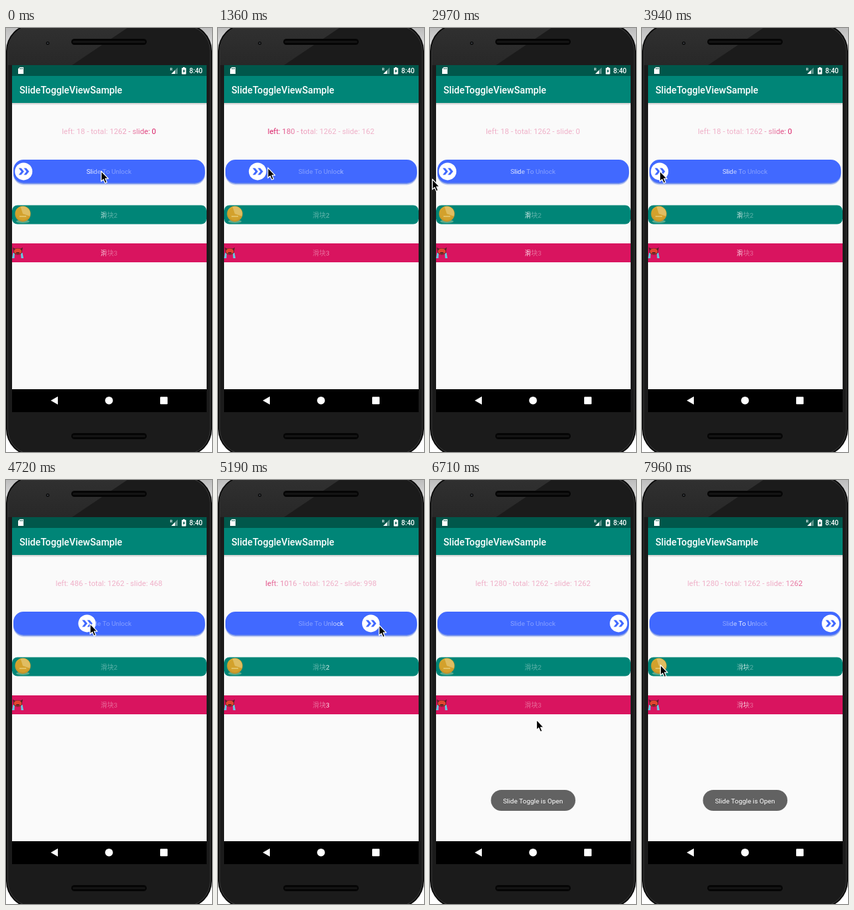
Recreate the animation shown at these times as an HTML page with a canvas. Size 306 px wide and 628 px high, loop 8000 ms.

```html
<!DOCTYPE html>
<html lang="en">
<head>
<meta charset="utf-8">
<title>Slide toggle</title>
<style>
html, body { margin: 0; width: 100%; height: 100%; overflow: hidden; background: #fff; }
canvas { display: block; width: 306px; height: 628px; }
</style>
</head>
<body>
<canvas id="stage"></canvas>
<script>
const W = 306, H = 628, LOOP = 8000, TOTAL = 1262;
const canvas = document.getElementById('stage');
const dpr = window.devicePixelRatio || 1;
canvas.width = W * dpr;
canvas.height = H * dpr;
const ctx = canvas.getContext('2d');
ctx.scale(dpr, dpr);

const TEAL = '#008577', DARK_TEAL = '#00574b', BLUE = '#4169ff', CRIMSON = '#d9145f';
const SANS = 'Roboto, sans-serif';
const CJK = 'Roboto, "Noto Sans CJK SC", "Noto Sans CJK", sans-serif';

const span = (t, from, to) => Math.min(1, Math.max(0, (t - from) / (to - from)));
const mix = (a, b, k) => a + (b - a) * k;

// A short pull that swings back, then a long pull to the end
function slideAt(t) {
  const swing = 307 * Math.sin(Math.PI * span(t, 900, 2680)) ** 2;
  const pull = TOTAL * (1 - (1 - span(t, 4460, 6150)) ** 2.76);
  return Math.round(swing + pull);
}

// Time, x measured from the travelling knob's rest frame, y
const cursorPath = [
  [0, 141, 212], [800, 36, 209], [1360, 41, 207], [2970, 3, 224], [3500, 26, 212],
  [4460, 26, 212], [5190, 38, 215], [6100, 21, 216], [6710, -96, 355],
  [7130, -178, 412], [7700, -251, 300], [7960, -227, 274]
];

function cursorAt(t, travel) {
  const i = Math.max(1, cursorPath.findIndex(p => p[0] >= t));
  const last = cursorPath.length - 1;
  const b = t > cursorPath[last][0] ? last : i;
  const [t0, x0, y0] = cursorPath[b - 1], [t1, x1, y1] = cursorPath[b];
  const k = span(t, t0, t1);
  return [mix(x0, x1, k) + travel, mix(y0, y1, k)];
}

function box(x, y, w, h, r, fill) {
  ctx.beginPath();
  ctx.roundRect(x, y, w, h, r);
  ctx.fillStyle = fill;
  ctx.fill();
}

function oval(x, y, rx, ry, fill) {
  ctx.beginPath();
  ctx.ellipse(x, y, rx, ry, 0, 0, Math.PI * 2);
  ctx.fillStyle = fill;
  ctx.fill();
}

const disc = (x, y, r, fill) => oval(x, y, r, r, fill);

function poly(points, fill) {
  ctx.beginPath();
  points.forEach(([x, y]) => ctx.lineTo(x, y));
  ctx.closePath();
  ctx.fillStyle = fill;
  ctx.fill();
}

function fade(y0, y1, from, to) {
  const g = ctx.createLinearGradient(0, y0, 0, y1);
  g.addColorStop(0, from);
  g.addColorStop(1, to);
  return g;
}

function text(str, x, y, font, fill, align = 'left') {
  ctx.font = font;
  ctx.textAlign = align;
  ctx.fillStyle = fill;
  ctx.fillText(str, x, y);
}

// Centred text with a highlight that sweeps from left to right
function shimmerText(str, y, font, rgb, baseAlpha, phase) {
  ctx.font = font;
  const w = ctx.measureText(str).width, left = 153 - w / 2, half = w * 0.42;
  const p = 0.5 - 0.5 * Math.cos(Math.PI * (phase % 1));
  const c = left - w / 2 + 2 * w * p;
  const g = ctx.createLinearGradient(c - half, 0, c + half, 0);
  for (let s = 0; s <= 8; s++) {
    const glow = (1 - Math.abs(s / 4 - 1)) ** 1.7;
    g.addColorStop(s / 8, `rgba(${rgb},${mix(baseAlpha, 1, glow)})`);
  }
  text(str, left, y, font, g);
}

function speaker(y) {
  box(97, y, 112, 9, 4.5, '#050505');
  box(99, y + 3, 108, 3, 1.5, '#141414');
}

function phone() {
  box(0, 0, W, H, 0, fade(0, 60, '#bdbdbd', '#fff'));
  box(0, -6, W, 640, 40, '#0a0a0a');
  box(2, -4, W - 4, 636, 38, '#3a3a3a');
  box(3, -3, W - 6, 634, 37, '#1b1b1b');
  ctx.save();
  ctx.clip();
  poly([[0, 0], [180, 0], [98, 55], [0, 55]], fade(0, 55, '#303030', '#282828'));
  ctx.restore();
  disc(62, 22.5, 2.5, '#0b0b0b');
  disc(62, 22.5, 1, '#4a4f58');
  speaker(16);
  speaker(600);
}

function appBar() {
  box(9, 55, 289, 514, 0, '#fafafa');
  box(9, 111, 289, 3, 0, fade(111, 114, 'rgba(0,0,0,.2)', 'rgba(0,0,0,.03)'));
  box(9, 55, 289, 16, 0, DARK_TEAL);
  box(9, 71, 289, 40, 0, TEAL);
  poly([[20.5, 58], [26, 58], [26, 68], [18, 68], [18, 60.5]], '#fff');
  for (let x = 20.5; x < 25; x += 1.8) box(x, 59, 0.8, 2.2, 0, DARK_TEAL);
  text('R', 243.5, 62.5, `500 6px ${SANS}`, '#fff');
  poly([[255, 58.5], [255, 68], [245.5, 68]], 'rgba(255,255,255,.35)');
  poly([[251, 62.5], [251, 68], [245.5, 68]], '#fff');
  box(261, 59, 6.5, 9.5, 0.8, '#fff');
  box(263, 58, 2.5, 1.5, 0, '#fff');
  poly([[264.8, 60.5], [262.4, 64.4], [263.9, 64.4], [263.7, 67], [266.1, 63.1], [264.6, 63.1]], DARK_TEAL);
  text('8:40', 292, 67, `500 10px ${SANS}`, '#fff', 'right');
  text('SlideToggleViewSample', 20, 97, `500 14.18px ${SANS}`, '#fff');
}

function navBar() {
  box(9, 535, 289, 34, 0, '#000');
  poly([[66.5, 551.7], [77, 545.7], [77, 557.7]], '#fff');
  disc(153, 551.7, 5.8, '#fff');
  box(229, 546.3, 11, 11, 1, '#fff');
}

function knob(x) {
  const y = 212.4;
  disc(x, y, 13, '#fff');
  for (const l of [x - 7.4, x + 0.2]) {
    poly([[l, y - 5], [l + 3.8, y - 5], [l + 8, y], [l + 3.8, y + 5], [l, y + 5], [l + 4, y]], BLUE);
  }
}

function coin() {
  const x = 25, y = 275.3;
  oval(x, y + 11.2, 10, 2.5, '#58aa8c');
  disc(x, y, 11.6, fade(y - 12, y + 12, '#dcab30', '#c0922c'));
  disc(x, y, 9.6, '#d3a12c');
  ctx.beginPath();
  ctx.moveTo(x, y);
  ctx.arc(x, y, 11, -Math.PI * 0.6, Math.PI * 0.1);
  ctx.fillStyle = '#e0bd62';
  ctx.fill();
  box(x - 5, y + 3, 10, 1.5, 0, '#e8cc74');
}

function imp() {
  const x = 17.5, y = 331;
  for (const s of [-1, 1]) {
    const at = (dx, dy) => [x + s * dx, y + dy];
    poly([at(4.5, 2), at(7, 2), at(8.5, 10), at(5, 10)], '#66cbe2');
    poly([at(7.5, -6), at(2.5, -3.5), at(6, 1)], '#5a2028');
  }
  oval(x, y, 6.5, 5, '#5a2028');
  oval(x, y - 0.3, 5.8, 4.3, '#e2452f');
  oval(x, y + 2.2, 3, 1, '#3b1d26');
}

function toast(alpha) {
  ctx.globalAlpha = alpha;
  box(90.5, 459, 125.5, 31, 15.5, '#626262');
  text('Slide Toggle is Open', 153, 478.7, `9.9px ${SANS}`, '#fff', 'center');
  ctx.globalAlpha = 1;
}

function cursor([x, y]) {
  ctx.save();
  ctx.translate(x, y);
  ctx.strokeStyle = '#fff';
  ctx.lineWidth = 1.2;
  ctx.lineJoin = 'round';
  poly([[0.5, 0], [0.5, 15.2], [3.8, 12.1], [6.3, 17.8], [9, 16.6], [6.6, 11.1], [11.2, 11.1]], '#000');
  ctx.stroke();
  ctx.restore();
}

function draw(t) {
  const slide = slideAt(t), travel = slide * 0.2012;
  const fast = 0.355 + t / 980, slow = 0.655 + t / 1960;
  const label = (str, y) => shimmerText(str, y, `9.8px ${CJK}`, '255,255,255', 0.36, fast);

  phone();
  appBar();
  navBar();
  shimmerText(`left: ${slide + 18} - total: ${TOTAL} - slide: ${slide}`, 157, `11.2px ${SANS}`, '217,20,95', 0.32, slow);

  box(11, 199, 284.5, 33.5, 15, 'rgba(65,105,225,.3)');
  box(11, 197, 284.5, 34, 15, 'rgba(65,105,225,.55)');
  box(11, 195, 284.5, 34.5, 15, BLUE);
  label('Slide To Unlock', 216);
  knob(26.2 + travel);

  box(9, 262.5, 289, 28, 8, TEAL);
  label('滑块2', 280.5);
  coin();

  box(9, 319, 289, 28, 0, CRIMSON);
  label('滑块3', 336.7);
  imp();

  toast(span(t, 6200, 6440));
  cursor(cursorAt(t, travel));
}

const start = performance.now();
function tick() {
  draw((performance.now() - start) % LOOP);
  requestAnimationFrame(tick);
}
tick();
</script>
</body>
</html>
```
